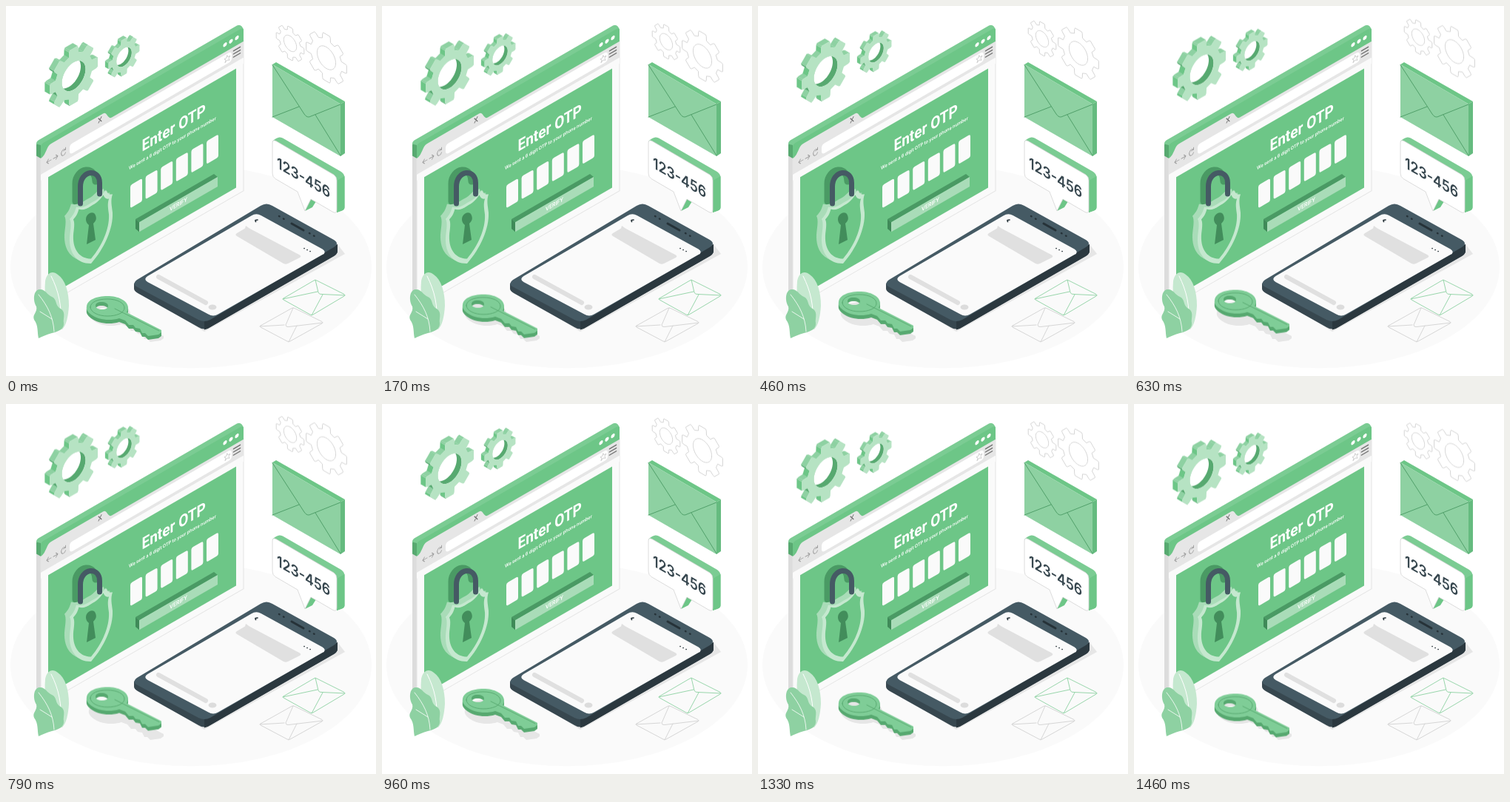
These frames come from a looping animation (500 by 500 pixels, 1500 ms). An HTML page:

```html
<!DOCTYPE html>
<html lang="en">
<head>
<meta charset="utf-8">
<title>Enter OTP</title>
<style>
  html, body { margin: 0; width: 100%; height: 100%; overflow: hidden; background: #fff; }
  svg { display: block; width: 100%; height: 100%; }
  text { font-family: Inter, Roboto, sans-serif; }
  .title { font-family: Roboto, Inter, sans-serif; }
  .float { animation: float 1.5s linear infinite; }
  @keyframes float { 50% { transform: translateY(-10px); } }
  .line { fill: none; stroke-linecap: round; stroke-linejoin: round; }
</style>
</head>
<body>
<svg viewBox="0 0 500 500">
  <defs>
    <path id="key" fill-rule="evenodd" d="M109 406C110 397 122 392 137 392C152 392 164 398 165 407C165 410 164 412 163 414L210 438V441L206 444L192 446L188 442L184 442L181 436L175 435L172 431L166 431L161 425L153 422C140 426 124 424 115 417C110 413 108 410 109 406ZM121 405C121 408 125 410 130 410C135 410 138 408 138 405C138 402 134 400 129 400C124 400 121 402 121 405Z"/>
    <!-- centred on its axis, later skewed into the wall -->
    <path id="shield" d="M0 -82C8 -81 14 -83 20 -88C22 -82 24 -79 29 -77C26 -70 28 -62 29 -52C30 -30 18 -10 0 0C-18 -10 -30 -30 -29 -52C-28 -62 -26 -70 -29 -77C-24 -79 -22 -82 -20 -88C-14 -83 -8 -81 0 -82Z"/>
  </defs>

  <ellipse cx="250" cy="352.500" rx="244" ry="137" fill="#fafafa"/>

  <!-- browser window -->
  <g transform="matrix(1 -.5774 0 1 47 187)">
    <path d="M0 19L-6 11V213.500L0 221Z" fill="#dcdcdc"/>
    <path d="M0 19V0L-3 -6Q-6 -6 -6 -3V12Z" fill="#57a970"/>
    <path d="M0 1L-6 -4Q-6 -7.500 -3 -7.500H265Q271 -7 274 3V6H0Z" fill="#7bcc93"/>
    <path d="M0 19H274V221H0Z" fill="#fafafa" stroke="#e4e4e4"/>
    <path d="M0 20V3Q0 0 3 0H270Q274 0 274 4V20Z" fill="#6dc687"/>
    <path d="M0 19C8 18 7 7 14 7H84C90 7 90 19 96 19H274V41H0Z" fill="#e6e6e6"/>
    <path d="M0 41H274V49H0Z" fill="#fafafa"/>
    <rect x="39" y="23" width="219" height="13.500" rx="4" fill="#fff"/>
    <rect x="10" y="50" width="254" height="161" fill="#6dc687"/>
    <g fill="#fff">
      <circle cx="249" cy="9" r="2.600"/><circle cx="257" cy="9" r="2.600"/><circle cx="265" cy="9" r="2.600"/>
    </g>
    <g class="line" stroke="#999" stroke-width=".9">
      <path d="M14 29H8M10.500 26L8 29L10.500 32M17 29H23M20.500 26L23 29L20.500 32M33 26A3 4 0 1 0 33.500 30M33.500 23.500V26.500H30.500"/>
      <path d="M78 10L82 16M82 10L78 16" stroke="#666" stroke-width="1"/>
      <path d="M252 25.500L253.200 28H256L254 30.200L255 33.500L252 31.500L249 33.500L250 30.200L248 28H250.800Z" stroke="#c4c4c4" stroke-width=".7"/>
      <path d="M260.500 24H269.500M260.500 28.200H269.500M260.500 32.400H269.500" stroke="#777" stroke-width="1.600"/>
    </g>
    <g id="cells" fill="#fafafa"></g>
    <path d="M128 175H234L239 182H133Z" fill="#4a9a64"/>
    <path d="M128 175L133 182V195L128 188Z" fill="#3f8a58"/>
    <rect x="133" y="182" width="106" height="13" fill="#a9dcb8"/>
  </g>
  <g fill="#fff">
    <text class="title" transform="matrix(.866 -.5 0 1 183.500 197)" font-size="22" font-weight="700">Enter OTP</text>
    <text transform="matrix(.866 -.5 0 1 166 221.500)" font-size="6.420" font-weight="600">We sent a 6 digit OTP to your phone number</text>
    <text transform="matrix(.866 -.5 0 1 233 270.500)" font-size="7.800" font-weight="600" text-anchor="middle">VERIFY</text>
  </g>

  <!-- padlock -->
  <path class="line" d="M94 264V240C94 230 101 223 108 222C116 221 121 228 121 237" stroke="#4a9a64" stroke-width="9"/>
  <g transform="matrix(1 -.5774 0 1 115 348)">
    <use href="#shield" x="-7" y="-8" fill="#a9dcb8"/>
    <use href="#shield" x="-3.500" y="-4" fill="#a9dcb8"/>
    <use href="#shield" fill="#c5e8cf"/>
    <use href="#shield" transform="translate(0 -6.500) scale(.83 .87)" fill="#6dc687"/>
  </g>
  <path class="line" d="M100.500 267V244C100.500 234 106 226.500 114 225.500C122 225 126.500 231 126.500 239V254" stroke="#455a64" stroke-width="7"/>
  <path d="M112 296C108 293 107 288 109 284C112 279 119 277 121 283C123 288 121 291 118 294L121 316L109 322Z" fill="#428d5b"/>

  <!-- leaves -->
  <path d="M64 438C56 415 51 392 53 372C55 360 63 357 70 363C80 370 85 386 85 405C84 420 82 430 76 437Z" fill="#c5e8cf"/>
  <path class="line" d="M61 365C71 385 76 405 74 434" stroke="#fff"/>
  <path d="M44 449C42 440 44 432 38 424C35 417 43 414 41 406C36 398 37 384 45 383C53 382 55 390 62 393C69 396 66 403 72 408C82 413 77 421 78 428C79 437 70 440 62 442C55 444 50 446 44 449Z" fill="#8ed1a2"/>
  <path class="line" d="M44 390C56 405 64 420 65 440M62 423L46 413" stroke="#fff" stroke-width=".8"/>

  <!-- envelope -->
  <path d="M360 79L365 76L458 129L452 132.500Z" fill="#6dc687"/>
  <path d="M452 132.500L458 129V199L452 203Z" fill="#65bb7f"/>
  <path d="M360 79L452 132.500V203L360 150Z" fill="#8ed1a2"/>
  <path class="line" d="M360 79.500L403 146Q407 152 412 149L452 133M360 150L396 136M452 202L418 147" stroke="#4a9a64" stroke-width=".9"/>

  <!-- message bubble -->
  <path d="M360 184Q361 180 369 177.500Q371 177 374 178.500L453 224Q457.500 227 457.500 232V272Q457.500 275 454 276.500L447 279V236L362 186Z" fill="#7bcc93"/>
  <path d="M447 236L457.500 230V272Q457.500 275 454 276.500L447 279Z" fill="#6dc687"/>
  <path d="M404 277L414 272L419 264L410 259Z" fill="#6dc687"/>
  <path d="M360 185Q360 180 365 182.500L443 228Q447 231 447 236V275Q447 281 442 278.500L412 261L404 277L394 251L364 233.500Q360 231 360 226Z" fill="#fff" stroke="#d4d4d4" stroke-width=".8"/>
  <text transform="matrix(.866 .5 0 1 366 218.500)" font-size="20.500" font-weight="600" fill="#37474f">123-456</text>

  <!-- phone -->
  <path d="M185 388L268 440L458 335L448 322Z" fill="#e6e6e6"/>
  <path d="M173 375V382Q173 385 178 388L260 434Q268 439 276 434L443 338Q448 335 448 331V322L268 400Z" fill="#37474f"/>
  <path d="M268 426V437.500Q272 437 276 434L443 338Q448 335 448 331V322Z" fill="#2b383f"/>
  <path d="M176 379Q170 375 177 370L344 270Q352 265 360 270L443 316Q451 321 443 326L276 424Q268 428 260 424Z" fill="#455a64"/>
  <path d="M192 372Q187 369 192 366L332 284.500Q338 281 344 284L427 329.500Q432 332.500 427 335L286 415.500Q280 419 274 415.500Z" fill="#fafafa" stroke="#fafafa" stroke-width="2.500"/>
  <g class="line" stroke="#263238">
    <path d="M386 294L402 303" stroke-width="3"/>
    <path d="M369 284L369.500 284.300M375 287.500L375.500 287.800M410 307L410.500 307.300M416 310.500L416.500 310.800" stroke-width="2.500"/>
    <path d="M340 289L337 289.500L337.500 291.500M403 327.500H403.100M407 329.500H407.100M411 331.500H411.100" stroke-width="1.700"/>
  </g>
  <path d="M312 311Q309 309 312 307L323 300.500L324 297L329 300.500L396 336Q400 338 397 340L381 348Q378 349.500 375 348Z" fill="#e0e0e0"/>
  <path class="line" d="M206 366L270 401" stroke="#e0e0e0" stroke-width="6"/>
  <ellipse cx="279" cy="407" rx="5.500" ry="3.500" fill="#dcdcdc"/>

  <!-- outlined envelopes -->
  <g class="line" stroke-width="1">
    <path stroke="#d6d6d6" d="M344 432L386 408.500Q388 407.500 390 408.500L427 426.500Q428.500 428 427 429L384 453Q382 454 380 453L344 434Q342.500 433 344 432ZM388 408L378 431Q378 434 382 433.500L428 428M343 433L376 431M382 454L393 432"/>
    <path stroke="#98d6ab" fill="#fafafa" d="M375 395L416 371Q418 370 420 371L457 389.500Q458.500 391 457 392L415 417Q413 418 411 417L375 397Q373.500 396 375 395ZM418 370L422 387Q423 390 427 389.500L458 391M374 396L421 386M413 418L428 390"/>
  </g>

  <!-- key -->
  <use href="#key" x="3" y="8" fill="#e6e6e6"/>
  <g class="float">
    <use href="#key" y="5" fill="#57a970"/>
    <use href="#key" y="2.500" fill="#57a970"/>
    <use href="#key" fill="#7fcd97"/>
    <path class="line" d="M114 407C114 400 124 396 137 396C150 396 160 401 160 408C160 415 149 419 137 419C125 419 114 414 114 407ZM147 409L207 439" stroke="#57a970" stroke-width=".9"/>
  </g>

  <g class="float" id="gears"></g>
</svg>
<script>
  const NS = 'http://www.w3.org/2000/svg';
  const add = (parent, tag, attrs) => {
    const el = document.createElementNS(NS, tag);
    for (const k in attrs) el.setAttribute(k, attrs[k]);
    return parent.appendChild(el);
  };
  const byId = id => document.getElementById(id);
  const gears = byId('gears');

  for (let i = 0; i < 6; i++)
    add(byId('cells'), 'rect', { x: 121 + 20.6 * i, y: 125, width: 16, height: 31, rx: 2.5 });

  // Points on a wall that rises to the right (tilt -1) or falls (tilt 1)
  const wall = (cx, cy, tilt) => (r, a) => {
    const u = r * Math.cos(a), v = r * Math.sin(a);
    return [cx + u * .866, cy + v + tilt * u * .5];
  };
  const toPath = pts => 'M' + pts.map(p => p.map(n => n.toFixed(2))).join('L') + 'Z';

  const TOOTH = [[-.26, .77], [-.2, .95], [-.16, 1], [.16, 1], [.2, .95], [.26, .77]];
  function outline(at, r) {
    const pts = [];
    for (let i = 0; i < 8; i++)
      for (const [da, k] of TOOTH) pts.push(at(r * k, i * Math.PI / 4 + da));
    return pts;
  }
  const ring = (at, r) => Array.from({ length: 48 }, (_, i) => at(r, i * Math.PI / 24));

  // Side faces turned towards the viewer, shaded by direction
  function sides(pts, dx, dy) {
    const back = ([x, y]) => [x + dx, y + dy];
    pts.forEach((p, i) => {
      const q = pts[(i + 1) % pts.length];
      const nx = q[1] - p[1], ny = p[0] - q[0];
      if (nx * dx + ny * dy <= 0) return;
      const fill = ny > .3 * Math.abs(nx) ? '#57a970' : ny > -.3 * Math.abs(nx) ? '#6dc687' : '#8ed1a2';
      add(gears, 'path', { d: toPath([p, q, back(q), back(p)]), fill, stroke: fill, 'stroke-width': .3 });
    });
  }

  function solidGear(cx, cy, r, hole, depth) {
    const at = wall(cx, cy, -1), rim = outline(at, r), inner = ring(at, hole);
    const dx = -depth, dy = -depth * .577, id = 'hole' + r;
    sides(rim, dx, dy);
    add(gears, 'path', { d: toPath(inner), fill: '#57a970' });
    add(add(gears, 'clipPath', { id }), 'path', { d: toPath(inner) });
    const far = inner.map(([x, y]) => [x + dx, y + dy]);
    add(gears, 'path', { d: toPath(far), fill: '#fff', 'clip-path': `url(#${id})` });
    add(gears, 'path', { d: toPath(rim) + toPath(inner), fill: '#b6e3c3', 'fill-rule': 'evenodd' });
  }

  function lineGear(cx, cy, r, hole) {
    const at = wall(cx, cy, 1);
    add(gears, 'path', {
      d: toPath(outline(at, r)) + toPath(ring(at, hole)), class: 'line', stroke: '#d4d4d4'
    });
  }

  solidGear(91.5, 94.5, 38, 18.5, 6.5);
  solidGear(159.5, 69, 24.5, 12, 4.5);
  lineGear(384, 50.5, 22, 10);
  lineGear(433, 70, 32, 14.5);
</script>
</body>
</html>
```
